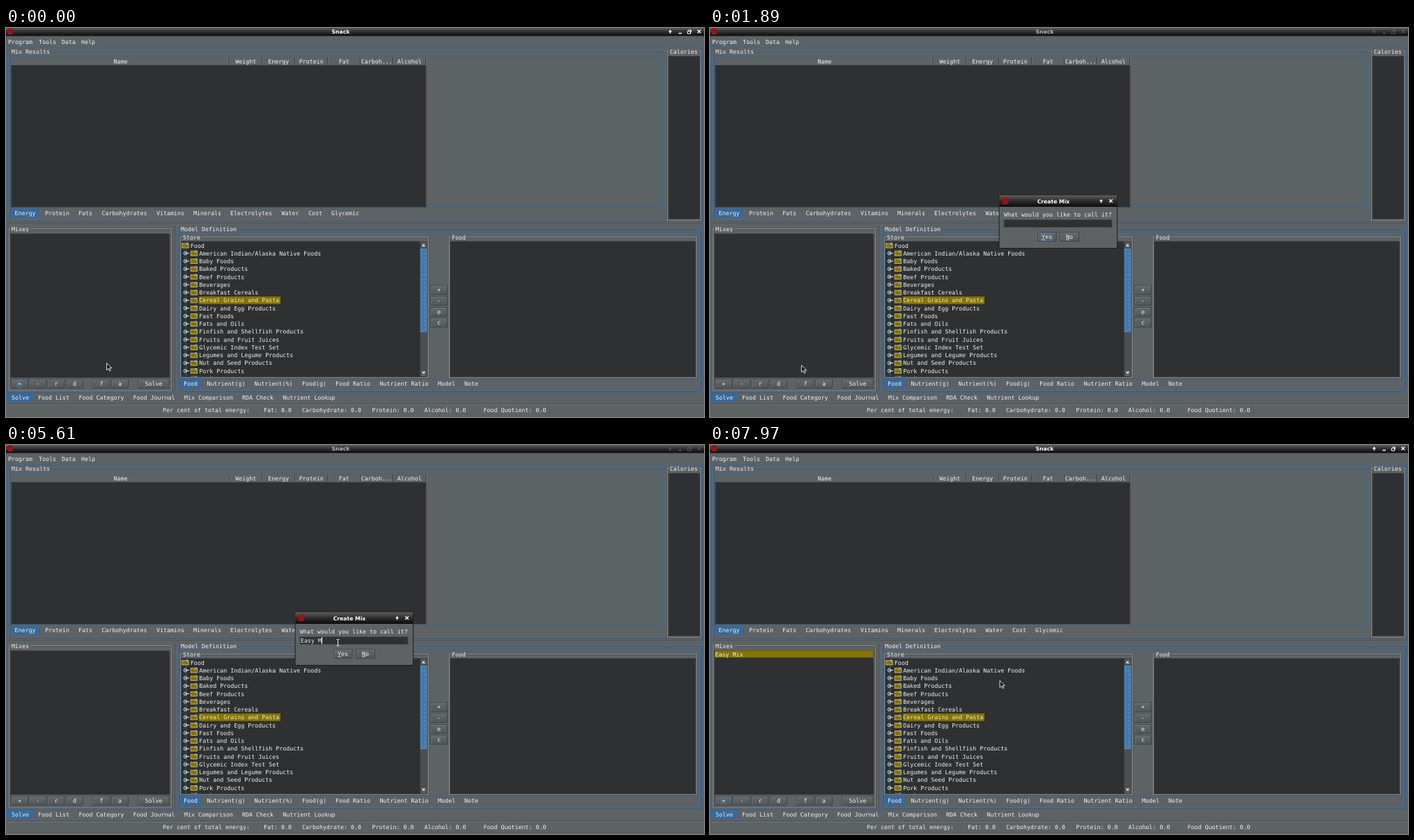
Write an HTML page that moves like this. It is 1002x559 px and loops after 8 s.

```html
<!DOCTYPE html>
<html lang="en">
<head>
<meta charset="utf-8">
<title>Snack</title>
<style>
html, body { margin: 0; width: 100%; height: 100%; overflow: hidden; background: #5d6265; }
svg { display: block; width: 1002px; height: 559px; }
text { font: 8.31px "DejaVu Sans Mono", monospace; fill: #f2f2f2; text-rendering: geometricPrecision; white-space: pre; }
.title { font: bold 7.7px "DejaVu Sans", sans-serif; fill: #fff; }
</style>
</head>
<body>
<script>
const BG = '#5d6265', DARK = '#2e3032', BLUE = '#35699f', LINE = '#85898c', OLIVE = '#857400';

const rect = (x, y, x2, y2, fill, stroke = 'none', more = '') =>
  `<rect x="${x}" y="${y}" width="${x2 - x}" height="${y2 - y}" fill="${fill}" stroke="${stroke}" ${more}/>`;
const path = (d, stroke, fill = 'none', w = 1) =>
  `<path d="${d}" stroke="${stroke}" fill="${fill}" stroke-width="${w}"/>`;
// y is the middle of the capitals
const text = (x, y, s, more = '') => `<text x="${x}" y="${y + 3}" ${more}>${s}</text>`;
const mid = (x, y, s, more = '') => text(x, y, s, `text-anchor="middle" ${more}`);
const group = (id, body) => `<g id="${id}">${body}</g>`;

const panel = (x, y, x2, y2, label, color = LINE) =>
  rect(x + 1, y + 1, x2 + 1, y2 + 1, 'none', '#4c5154') + rect(x, y, x2, y2, 'none', color) +
  rect(x + 2, y - 3, x + 5 + label.length * 5, y + 4, BG) + text(x + 3.5, y, label);

const well = (x, y, x2, y2) => rect(x - .5, y - .5, x2 + .5, y2 + .5, DARK, '#45494b');

const button = (x, y, x2, y2, label, more = '') =>
  rect(x + .5, y + .5, x2 - .5, y2 - .5, 'url(#face)', '#404447', more) +
  path(`M${x + 1.4} ${y2 - 1.2}V${y + 1.4}H${x2 - 1.2}`, '#74787b', 'none', .8) +
  mid((x + x2) / 2, (y + y2) / 2 - .2, label);

const focusBox = (x, y, x2, y2) => rect(x, y, x2, y2, 'none', '#4480ba', 'stroke-width=".9"');

const tabs = (y, x1, x2, list) =>
  rect(x1, y - 6.3, x2, y + 5.7, BLUE, 'none', 'rx="1.5"') + list.map(([x, s]) => text(x, y, s)).join('');

const arrowUp = (x, y) => path(`M${x} ${y + 2.8}V${y}`, 'currentColor', 'none', 1.5) +
  path(`M${x - 2.6} ${y + .4}L${x} ${y - 2.6}L${x + 2.6} ${y + .4}Z`, 'none', 'currentColor');
const cross = (x, y) => path(`M${x - 2.3} ${y - 2.3}l4.6 4.6m0 -4.6l-4.6 4.6`, 'currentColor', 'none', 1.3);

function titleBar() {
  return rect(0, 0, 1002, 11.5, 'url(#bar)') +
    '<circle cx="6" cy="5.3" r="4.7" fill="#8e1717"/>' +
    mid(480.5, 5.2, 'Snack', 'class="title" id="name"') +
    group('controls', arrowUp(953.5, 5) + path('M965.5 7.6h4.5', 'currentColor', 'none', 1.5) +
      path('M979.5 3h4v3.5M978.5 4.5h4v3.7h-4z', 'currentColor') + cross(995, 5));
}

function results() {
  const edges = [321, 368, 415, 462, 509, 556, 603];
  const heads = ['Weight', 'Energy', 'Protein', 'Fat', 'Carboh...', 'Alcohol'];
  return panel(4.5, 33.5, 946.5, 276.5, 'Mix Results', '#4a7299') +
    rect(6.5, 41, 943, 258, 'none', BLUE) +
    well(8, 54, 602.5, 257) +
    rect(8, 42, 603, 53.5, BG) + path('M8 53.5H603', '#45494b') +
    mid(164.5, 47.7, 'Name') +
    edges.map(x => path(`M${x - .5} 42.5V53`, '#3c4042') + path(`M${x + .5} 42.5V53`, '#777b7e', 'none', .6)).join('') +
    heads.map((s, i) => mid(edges[i] + 23.3, 47.7, s)).join('') +
    tabs(266.3, 6.5, 49, [[12.5, 'Energy'], [56, 'Protein'], [104, 'Fats'], [137.5, 'Carbohydrates'],
      [216, 'Vitamins'], [269, 'Minerals'], [322, 'Electrolytes'], [395.5, 'Water'], [434, 'Cost'], [467, 'Glycemic']]) +
    panel(949.5, 33.5, 997.5, 276.5, 'Calories') + well(951.5, 41, 995.5, 274);
}

function mixes() {
  const keys = [[7, '+'], [33, '-'], [59.5, 'r'], [86, 'd'], [124.5, 'f'], [151, 'a']];
  return panel(4.5, 288.5, 237.5, 521.5, 'Mixes') + well(7, 296, 234.5, 502) +
    group('entry', rect(7, 295.5, 234.5, 305.5, OLIVE) + text(7.5, 300.5, 'Easy Mix')) +
    keys.map(([x, s]) => button(x, 504.5, x + 25, 518, s)).join('') +
    button(189, 504.5, 235, 518, 'Solve') +
    group('focus', focusBox(16, 506.5, 23, 516)) +
    group('press', rect(7.5, 505, 31.5, 517.5, '#3f4447', LINE) + mid(19.5, 511, '+'));
}

const foods = ['American Indian/Alaska Native Foods', 'Baby Foods', 'Baked Products', 'Beef Products', 'Beverages',
  'Breakfast Cereals', 'Cereal Grains and Pasta', 'Dairy and Egg Products', 'Fast Foods', 'Fats and Oils',
  'Finfish and Shellfish Products', 'Fruits and Fruit Juices', 'Glycemic Index Test Set',
  'Legumes and Legume Products', 'Nut and Seed Products', 'Pork Products', 'Poultry Products'];

const folder = (x, y) => path(`M${x} ${y + 3.5}v-6.5h4l1 1h4.5v5.5z`, '#d8c882', OLIVE, .8) +
  path(`M${x + 5} ${y - 3.2}h4.5`, '#9fc3e8', 'none', 1.2);

function tree() {
  const rows = foods.map((s, i) => {
    const y = 323.7 + i * 11.27, on = i === 6;
    return path(`M258 ${y - 8}V${y - 2}`, '#55728f', 'none', .7) +
      `<circle cx="257.5" cy="${y}" r="2.4" fill="#2c5a86" stroke="#cfdfee" stroke-width=".9"/>` +
      path(`M257 ${y}H263`, '#e0e9f2') + folder(265.2, y) +
      (on ? rect(276.8, y - 5.5, 394, y + 5.4, OLIVE) : '') +
      text(277.3, y, s, on ? 'style="fill:#f3edbd"' : '');
  }).join('');
  return well(252, 307, 594, 501) +
    `<g clip-path="url(#treeBox)">${folder(252.7, 312.5) + text(264.7, 312.5, 'Food') + rows}</g>` +
    rect(595, 307, 604, 501, '#4b5053', '#3c4042') +
    rect(595.5, 307.5, 603.5, 316.5, BG, '#404447') + rect(595.5, 491, 603.5, 500.5, BG, '#404447') +
    path('M597 313.5h5l-2.5 -3zM597 494h5l-2.5 3z', 'none', '#f2f2f2') +
    rect(595.5, 317.5, 603.5, 436.5, '#3f7cb4', '#5590c6') + rect(597, 320, 602.5, 434, 'url(#bumps)');
}

function model() {
  return panel(247.5, 288.5, 996.5, 521.5, 'Model Definition', '#4a7299') +
    rect(249.5, 294.5, 993.5, 504, 'none', BLUE) +
    panel(250.5, 300.5, 606.5, 502.5, 'Store') + tree() +
    panel(636.5, 300.5, 991.5, 502.5, 'Food') + well(638, 307, 989.5, 501) +
    ['+', '-', 'e', 'c'].map((s, i) => button(609, 369.7 + i * 15.65, 634, 383.5 + i * 15.65, s)).join('') +
    tabs(511.3, 250, 280, [[255, 'Food'], [288.5, 'Nutrient(g)'], [356.5, 'Nutrient(%)'], [425, 'Food(g)'],
      [473, 'Food Ratio'], [536.5, 'Nutrient Ratio'], [620, 'Model'], [658, 'Note']]);
}

function footer() {
  const stats = [[225, 'Per cent of total energy:'], [370, 'Fat: 0.0'], [425, 'Carbohydrate: 0.0'],
    [525.5, 'Protein: 0.0'], [600.5, 'Alcohol: 0.0'], [685.5, 'Food Quotient: 0.0']];
  return tabs(531.3, 1, 40, [[8, 'Solve'], [46, 'Food List'], [104.5, 'Food Category'], [182.5, 'Food Journal'],
    [256, 'Mix Comparison'], [339, 'RDA Check'], [397.5, 'Nutrient Lookup']]) +
    path('M0 540.5H1002', '#4a4e50') + path('M0 541.5H1002', '#74787b') +
    stats.map(([x, s]) => text(x, 548.8, s)).join('');
}

function dialog() {
  return rect(415, 240, 584.5, 316.5, BG, '#1c1c1c', 'rx="1.5"') +
    rect(415.5, 240.5, 584, 257, 'url(#bar)') +
    '<circle cx="424" cy="248.5" r="5.2" fill="#8e1717"/>' +
    mid(493, 249, 'Create Mix', 'class="title"') +
    arrowUp(561.5, 248.5) + cross(575.5, 248.5) +
    text(422, 268, 'What would you like to call it?') +
    rect(422, 275.5, 577, 286.5, DARK, '#494d50') +
    text(423, 280.8, '', 'id="field"') + rect(423, 276, 424, 286, '#f2f2f2', 'none', 'id="caret"') +
    button(470, 293, 497.5, 307, 'Yes', 'id="yes"') + button(502, 293, 530, 307, 'No') +
    group('yesFocus', focusBox(475.3, 295, 491.5, 305.3)) +
    path('M476 304.3h5M511 304.3h5', '#f2f2f2', 'none', .8);
}

const stop = (o, c) => `<stop offset="${o}" stop-color="${c}"/>`;
const shade = (id, a, b, c) =>
  `<linearGradient id="${id}" x1="0" y1="0" x2="0" y2="1">${stop(0, a) + stop(.5, b) + stop(1, c)}</linearGradient>`;

document.body.innerHTML = `<svg viewBox="0 0 1002 559"><defs>
${shade('bar', '#5c5c5c', '#2c2c2c', '#0c0c0c')}${shade('face', '#64696c', '#5a5f62', '#525759')}
<pattern id="bumps" width="4" height="6" patternUnits="userSpaceOnUse">
<rect width="1.3" height="1.3" fill="#5f9ace"/><rect x="2" y="3" width="1.3" height="1.3" fill="#2f629a"/></pattern>
<clipPath id="treeBox">${rect(252, 307, 594, 501, '#fff')}</clipPath></defs>
${rect(0, 0, 1002, 559, BG) + titleBar()}
${['Program', 'Tools', 'Data', 'Help'].map((s, i) => text([3, 47, 80, 108][i], 20, s)).join('')}
${rect(1.5, 28, 1000.5, 524, 'none', BLUE) + path('M2 280.5H1000M242.5 283V522', '#4f5457')}
${results() + mixes() + model() + footer() + group('dialog', dialog())}
${group('arrow', path('M0 0V10L2.4 7.8L4.1 11.4L5.7 10.6L4.1 7.2H7.3Z', '#f4f4f4', '#151515', .9))}
${group('beam', path('M-2 -4.5h1.5l.5 .5l.5 -.5h1.5M0 -4V4M-2 4.5h1.5l.5 -.5l.5 .5h1.5', '#f4f4f4'))}
</svg>`;

const el = id => document.getElementById(id);
const show = (id, on) => el(id).setAttribute('visibility', on ? 'visible' : 'hidden');

// time, x, y of the pointer
const track = [[0, 144.5, 481.5], [470, 144.5, 481.5], [680, 121, 489], [900, 55, 508], [1070, 30, 514], [1300, 23.5, 511],
  [1540, 23.5, 511], [1720, 58, 503], [1890, 130.5, 485], [2130, 325, 393], [2370, 465, 313], [2410, 467, 305],
  [2560, 482, 293], [2760, 476.5, 284], [6870, 476.5, 284], [7020, 478.5, 295], [7180, 482, 302],
  [7730, 482, 302], [7850, 453, 322], [7970, 416, 338.5], [8000, 416, 338.5]];
const keys = [4270, 4520, 4750, 5040, 5180, 5610, 5830, 5990];
const blinks = [2910, 3430, 4050, 6590, 6910];

function pointer(t) {
  const i = track.findIndex(p => p[0] > t), a = track[i - 1], b = track[i];
  const k = (t - a[0]) / (b[0] - a[0]);
  return [1, 2].map(n => a[n] + (b[n] - a[n]) * k);
}

function draw(t) {
  const open = t >= 1620 && t < 7440;
  const typed = keys.filter(k => k <= t).length;
  const [x, y] = pointer(t);
  const beam = open && x > 422 && y < 288;
  show('dialog', open);
  show('focus', !open);
  show('press', t >= 1440 && t < 1580);
  show('entry', t >= 7540);
  show('caret', open && blinks.filter(b => b <= t).length % 2);
  show('yesFocus', open && (t < blinks[0] || t >= 7350));
  show('arrow', !beam);
  show('beam', beam);
  el('name').style.fill = open ? '#b5b5b5' : '#fff';
  el('controls').style.color = open ? '#565656' : '#fff';
  el('dialog').style.color = '#fff';
  el('yes').setAttribute('fill', t >= 7350 ? '#3f4447' : 'url(#face)');
  el('field').textContent = 'Easy Mix'.slice(0, typed);
  el('caret').setAttribute('x', 423 + typed * 5);
  el(beam ? 'beam' : 'arrow').setAttribute('transform', `translate(${x.toFixed(1)} ${y.toFixed(1)})`);
}

const start = performance.now();
function loop(now) {
  draw(Math.max(0, now - start) % 8000);
  requestAnimationFrame(loop);
}
draw(0);
requestAnimationFrame(loop);
</script>
</body>
</html>
```
